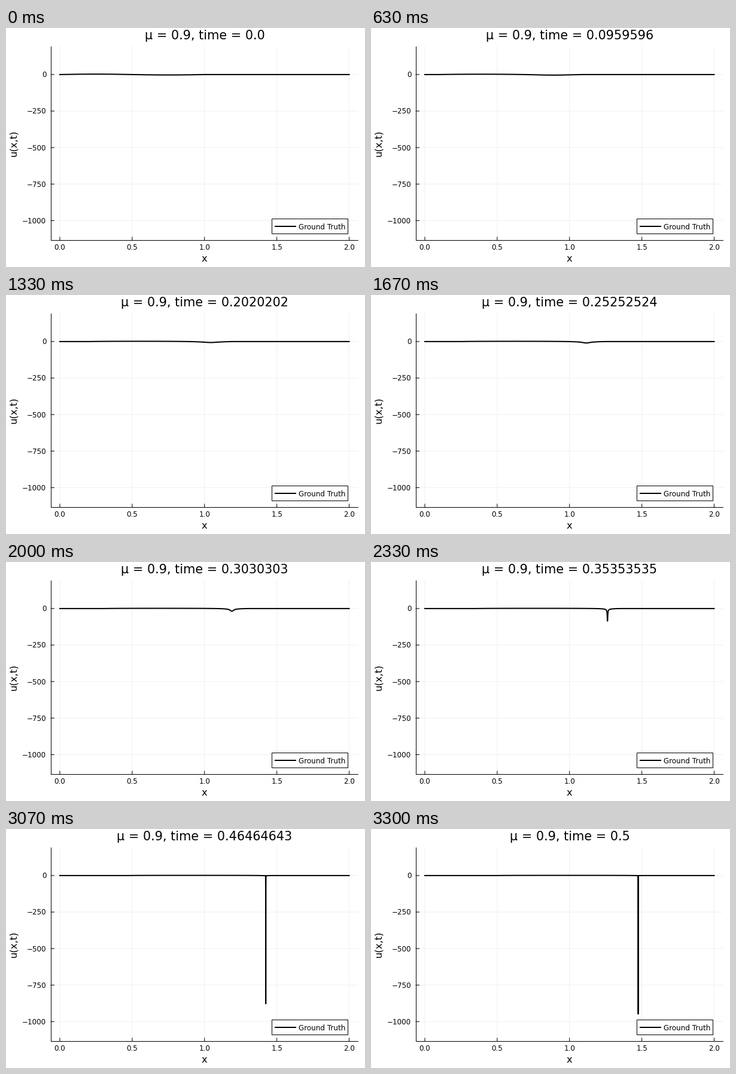
Recreate the animation shown at these times as a matplotlib script. Size 600 by 400 pixels, loop 3330 ms.

```python
import numpy as np
import matplotlib.pyplot as plt
from matplotlib.animation import FuncAnimation
from matplotlib.patches import Rectangle

W, H, DPI = 600, 400, 100
POSES, LOOP, TICK = 100, 3330, 10
MU, NU = 0.9, 1e-4
STEP = 1.3e-4  # half width of the difference stencil

plt.rcParams["font.family"] = "DejaVu Sans"
plt.rcParams["path.simplify"] = False


def px(size):
    return size * 72 / DPI


def sx(x):
    return 90 + 241.75 * x


def sy(u):
    return 77.9 - 0.2444 * u


def potential(x):
    """Integral of the initial speed 1 + MU/2 (1 - cos 2 pi x) on [0, 1]."""
    c = np.clip(x, 0, 1)
    return x + MU / 2 * (c - np.sin(2 * np.pi * c) / (2 * np.pi))


def speed(x, t):
    """Viscous Burgers solution by the Cole-Hopf transform."""
    pad = 6 * np.sqrt(2 * NU / t)
    c = np.linspace(1 - pad, 1 + MU + pad, 400)
    g = potential(x[:, None] - t * c) + t * c**2 / 2
    w = np.exp((g.min(axis=1, keepdims=True) - g) / (2 * NU))
    return w @ c / w.sum(axis=1)


def slope(x, t):
    if t == 0:
        return np.where(x < 1, MU * np.pi * np.sin(2 * np.pi * x), 0)
    return (speed(x + STEP, t) - speed(x - STEP, t)) / (2 * STEP)


def pose(k):
    """Title and curve points of step k."""
    t = 0.5 * k / (POSES - 1)
    shock = 0.75 + (1 + MU / 2) * t
    x = np.union1d(np.linspace(0, 2, 301),
                   shock + np.linspace(-0.03, 0.03, 301))
    scale = np.float32(1e8)
    shown = str(np.rint(np.float32(t) * scale) / scale)
    return f"μ = {MU}, time = {shown}", sx(x), sy(slope(x, t))


fig = plt.figure(figsize=(W / DPI, H / DPI), dpi=DPI, facecolor="white")
ax = fig.add_axes([0, 0, 1, 1])
ax.set_xlim(0, W)
ax.set_ylim(H, 0)
ax.axis("off")


def line(x, y, width=1, color="black", **kw):
    return ax.plot(x, y, color=color, lw=px(width), **kw)[0]


def text(x, y, s, size, ha="center", **kw):
    return ax.text(x, y, s, fontsize=px(size), ha=ha, va="baseline", **kw)


LEFT, RIGHT, TOP, BOTTOM = 75, 588, 31, 355
GRID = "#f0f0f0"

for v in (0, 0.5, 1, 1.5, 2):
    x = sx(v)
    line([x, x], [TOP, BOTTOM], color=GRID, snap=False)
    line([x, x], [BOTTOM, BOTTOM - 5], zorder=3, snap=False)
    text(x, 371, f"{v:.1f}", 11.9)
for v in (0, -250, -500, -750, -1000):
    y = sy(v)
    line([LEFT, RIGHT], [y, y], color=GRID, snap=False)
    line([LEFT, LEFT + 5.5], [y, y], zorder=3, snap=False)
    text(67.3, y + 4.4, str(v).replace("-", "−"), 11.9, ha="right")

line([LEFT, RIGHT], [BOTTOM, BOTTOM], zorder=3)
line([LEFT, LEFT], [TOP, BOTTOM], zorder=3)
text(331.4, 391.2, "x", 16.4)
text(17, 193, "u(x,t)", 16.4, rotation=90, rotation_mode="anchor")
title = text(332, 18.8, "", 20.8)

curve = line([], [], 2, zorder=4, solid_joinstyle="round",
             solid_capstyle="projecting", snap=False)

ax.add_patch(Rectangle((444, 319), 127, 25, fc="white", ec="black",
                       lw=px(1), zorder=5))
line([449, 485], [332, 332], 2, zorder=6, solid_capstyle="butt")
text(489, 336.8, "Ground Truth", 11.9, ha="left", zorder=6)

poses = [pose(k) for k in range(POSES)]


def draw(i):
    # 30 steps per second, held on a 10 ms clock
    label, x, y = poses[int((i + 0.5) * TICK * 0.03)]
    curve.set_data(x, y)
    title.set_text(label)
    return curve, title


anim = FuncAnimation(fig, draw, frames=LOOP // TICK, interval=TICK,
                     repeat=True, repeat_delay=0)
plt.show()
```
